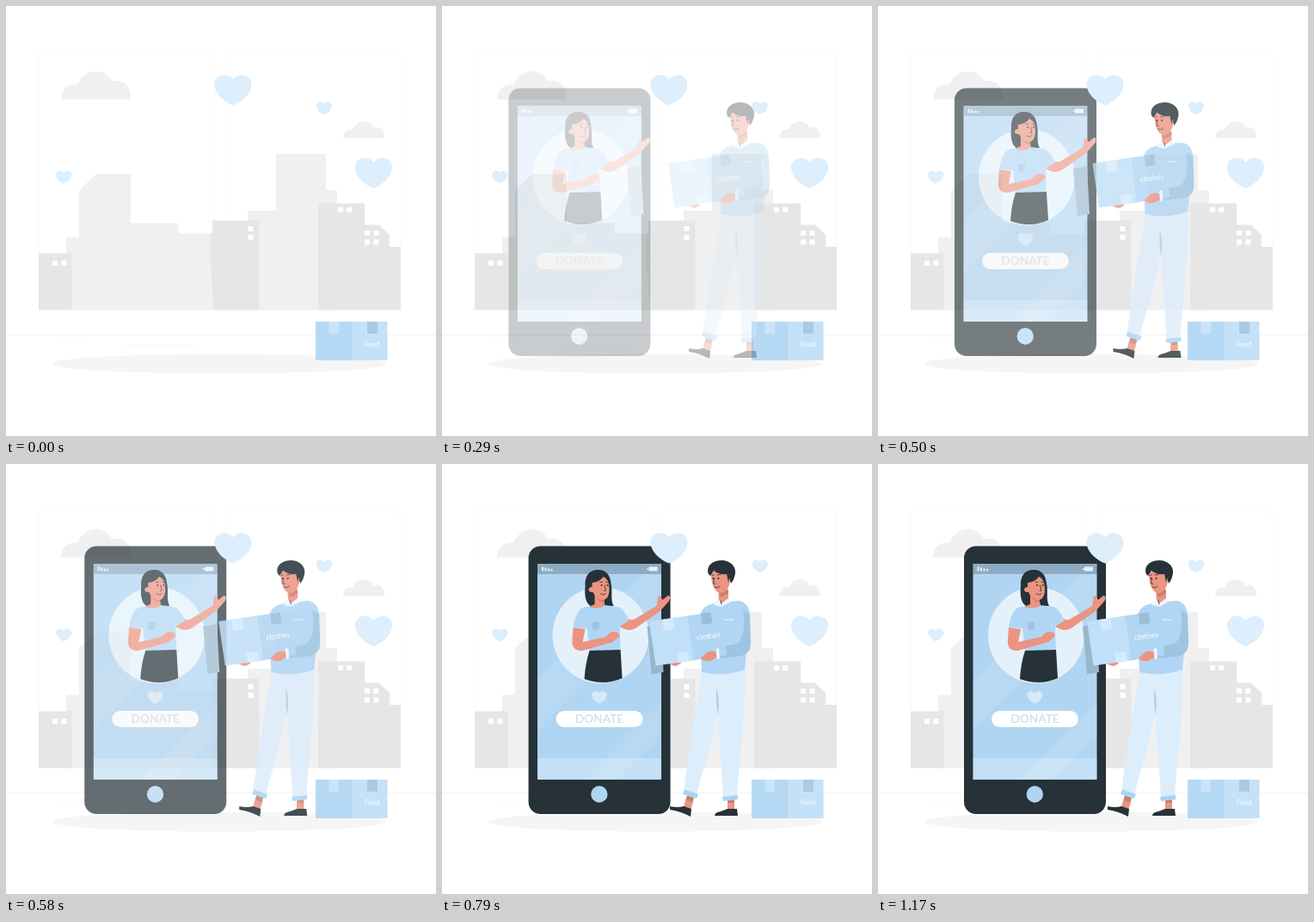
These frames come from a looping animation (500x500 px, 1.21 s). An HTML page:

```html
<!DOCTYPE html>
<html lang="en">
<head>
<meta charset="utf-8">
<title>Donation</title>
<style>
html, body { margin: 0; width: 100%; height: 100%; overflow: hidden; background: #fff; }
svg { display: block; width: 100%; height: 100%; }
text { font-family: Lato, "Open Sans", sans-serif; }
.dark { fill: #263238; }
.skin { fill: #eb9481; }
.shade { fill: #c97f70; }
.blue { fill: #b1d6f5; }
.line { fill: none; stroke: #263238; stroke-width: .8; stroke-linecap: round; }
</style>
</head>
<body>
<svg viewBox="0 0 500 500">
  <defs>
    <path id="heart" d="M0 17.5C-9 14-21.5 5-21.5-7.5C-21.5-18-6-21.5 0-12.5C6-21.5 21.5-18 21.5-7.5C21.5 5 9 14 0 17.5Z"/>
    <path id="cloud" d="M0 32.5C0 21 9 13.5 19 16C23 6 31 0 40 0C50 0 57 5 59.5 12C72 7 82 18 81 32.5Z"/>
    <clipPath id="screen"><path d="M110.5 116H254.5V367H110.5Z"/></clipPath>
  </defs>

  <g id="scene">
    <path d="M38.5 353V55.5H242.5V353M255.5 353V55.5H458.5V353" fill="none" stroke="#fafafa"/>
    <path d="M0 382.5H500" stroke="#f3f3f3"/>
    <path d="M57 390.5H97M135 395.5H225" stroke="#f8f8f8"/>
    <g fill="#f0f0f0">
      <use href="#cloud" x="64" y="76"/>
      <use href="#cloud" transform="translate(392 134.3) scale(.593)"/>
      <path d="M70 353.5V268.5H85V214L105 195.5H145V252.5H200.5V264.5H281V238H314V172H372V214H385V353.5Z"/>
    </g>
    <path fill="#e6e6e6" d="M38 287.5H76.5V353.5H38ZM240 249.5H294.5V353.5H241.5L238 300Q237 284 237.500 268L240 263ZM363 229.500H417V254.500H434L446 266V280H459V353.500H363Z"/>
    <g id="windows" fill="#fff"></g>
    <ellipse cx="248" cy="416" rx="194" ry="11.500" fill="#f5f5f5"/>
  </g>

  <g id="phone">
    <rect class="dark" x="100" y="95.500" width="165" height="311.500" rx="14"/>
    <g clip-path="url(#screen)">
      <path fill="#b0d5f3" d="M110 116H255V367H110Z"/>
      <g fill="#fff" fill-opacity=".1">
        <path d="M110 252L234 128H255V165L110 310Z"/>
        <path d="M165 367L255 277V315L203 367Z"/>
      </g>
      <path fill="#fff" fill-opacity=".25" d="M110 342H255V367H110Z"/>
      <path fill="#263238" fill-opacity=".25" d="M110 116H255V128H110Z"/>
    </g>
    <g fill="#e4f1fb">
      <path d="M115.500 119.500h2v5h-2zM119 120.500h2v4h-2zM122.500 121.500h2v3h-2zM126 122h2v2.500h-2zM240 119.500h10v5h-10zM238 121h1.500v2h-1.500z"/>
      <circle cx="184" cy="199" r="56"/>
      <use href="#heart" transform="translate(182.3 271.500) scale(.41)" fill-opacity=".7"/>
    </g>
    <rect x="132" y="287" width="101" height="19" rx="9.500" fill="#fff"/>
    <text x="182.500" y="301.300" text-anchor="middle" font-size="13.600" font-weight="700" fill="#dde0e2">DONATE</text>
    <circle cx="182.300" cy="384" r="9.700" fill="#b0d5f3"/>

    <path fill="#99b6cb" d="M238 189L254 186L257 242L243 244.500Z"/>
    <path class="dark" d="M181 123C170 123 165 131 166 142C165 152 166 161 172 165H199C195 158 198 148 196 139C195 129 190 123 181 123Z"/>
    <path class="skin" d="M206 184L214 179Q220 183 224 180L249 165L251 154L253 153L256 158L262 153C266 153 265 158 262 161L253 171L226 190C219 195 212 193 206 189Z"/>
    <path class="blue" d="M166 166L188 164L204 166C210 168 214 176 217 182L206 189L207 218H171L168 191L152 190C154 178 157 168 166 166Z"/>
    <path class="skin" d="M177 152L187 153L189 165Q179 170 170 166L177 163Z"/>
    <path class="shade" d="M178 154Q183 159 188 158L188 161Q181 160 178 154Z"/>
    <path class="skin" d="M174 138Q183 137 187 131Q194 134 194 145C194 155 190 159 185 158Q178 156 175 149C169 150 168 143 174 143Z"/>
    <path class="line" d="M183 137.500L186 137M190 137L193 138M188.500 141L190 147L188 147.500M184 151Q188 153 190 150.500"/>
    <circle class="dark" cx="185" cy="141" r="1"/><circle class="dark" cx="192" cy="141" r="1"/>
    <path class="dark" d="M171 217L207 216L209 249Q188 258.500 165 250Q166 232 171 217Z"/>
    <path class="skin" d="M152 190L166 192L163 207L190 201C194 195 200 193 205 197L206 200L198 207L163 217C153 218 150 212 151 203Z"/>
    <path fill="#9bc5e7" d="M174 184L182 183V191L178 194L174 192Z"/>
  </g>

  <g fill="#ddeefc">
    <use href="#heart" x="264" y="98"/>
    <use href="#heart" x="427.500" y="194.500"/>
    <use href="#heart" transform="translate(369.800 119) scale(.42)"/>
    <use href="#heart" transform="translate(67.200 199) scale(.42)"/>
  </g>

  <g id="crate">
    <path fill="#b5d9f5" d="M360 367H403V412H360Z"/>
    <path fill="#c5e1f8" d="M402.500 367H443.500V412H402.500Z"/>
    <path fill="#cbe4f9" d="M375.500 367H387V381H375.500Z"/>
    <path fill="#aacae0" d="M420 367H432V381H420Z"/>
    <text x="417" y="396" font-size="7.800" fill="#fff">Food</text>
  </g>

  <g id="man">
    <path class="shade" d="M287 385L295 388L291 402L283 399ZM334 389H342V403H334Z"/>
    <path class="skin" d="M286 391L294 393L291 402L283 399ZM334 394H342V403H334Z"/>
    <path class="dark" d="M267 398Q276 400 283 398L292 401L291 410Q280 404 267 402ZM319 409Q319 405 326 404L334 401H345L346 409Z"/>
    <path fill="#dcedfb" d="M305 241L354 236C356 280 348 340 345 387L329 388C327 350 324 312 322 288C316 325 305 355 298 385L283 381C288 345 296 290 305 241Z"/>
    <path fill="#b6cddd" d="M321.500 260Q325 276 323 292Q320 276 321.500 260Z"/>
    <path fill="#a9d2f3" d="M284 378.500L300 384L298 389L282 384ZM328 387L346 385V390L329 392Z"/>
    <path class="blue" d="M322 161L347 159C355 160 359 166 360 175L354 239Q330 248 304 242L301 180Q303 167 312 164Z"/>
    <path fill="#9ec4e1" d="M352 170Q356 200 345 209L322 214V226L346 224C358 222 361 216 361 207L360 175Z"/>
    <path class="skin" d="M323 146H335V158Q329 163 324 161Z"/>
    <path class="shade" d="M325 150Q331 149 334 145L335 150Q329 155 325 154Z"/>
    <path fill="#eef6fd" d="M318 160L324 158L327 162L335 156L338 160L327 166L319 164Z"/>
    <path class="line" d="M326 159L327 163"/>
    <path class="skin" d="M315 128Q320 121 335 123L336 130C341 127 343 134 337 137Q335 147 328 150C320 151 315 142 315 128Z"/>
    <path class="dark" d="M311 124C311 116 319 112 327 112C337 112 344 119 343 127Q342 134 338 139L336 132L335 138L333 128Q324 129 318 124L314 130Q311 128 311 124Z"/>
    <path class="line" d="M315.500 130L318 129M322 129L326 128.500M318.500 133L317.500 139L320 139.500M319 143Q322 145 325 142.500"/>
    <circle class="dark" cx="317.500" cy="133" r="1"/><circle class="dark" cx="323.500" cy="133" r="1"/>
    <path class="skin" d="M265 231L278 229L280 232L274 235Q268 234 265 231Z"/>
    <path fill="#c0dff8" d="M243 183L287 176.500L294 228.500L250.500 234.500Z"/>
    <path fill="#b1d6f4" d="M287 176.500L326 171L333 222L294 228.500Z"/>
    <path fill="#d5eafc" d="M258 181L271 179L272 192L260 194ZM275 220L288 218L290 229L277 231Z"/>
    <path fill="#9cbdd7" d="M303 174L314.500 172.500L316.500 185L304.500 187Z"/>
    <text transform="translate(298.500 205) rotate(-8)" font-size="8.900" fill="#fff">clothes</text>
    <path class="skin" d="M303 226L310 219Q316 216 322 219V225L314 229Q307 230 303 226Z"/>
    <path fill="#eef6fd" d="M320.500 215L324 214L325 226L321.500 227Z"/>
    <path d="M330 181H341" stroke="#e2f1fd" stroke-width="1.300"/>
  </g>
</svg>
<script>
const LOOP = 1210, FRAME = 1000 / 24, HIDDEN = 3, LAST = 28;
const $ = id => document.getElementById(id);

const panes = [[54, 296], [64.5, 296], [281.5, 256], [281.5, 266], [386, 234], [396, 234],
  [417, 261], [427.5, 261], [417, 271.5], [427.5, 271.5]];
$("windows").innerHTML = panes.map(([x, y]) => `<rect x="${x}" y="${y}" width="6" height="6"/>`).join("");

const bezier = (a, b, u) => 3 * a * u * (1 - u) ** 2 + 3 * b * u * u * (1 - u) + u ** 3;

// cubic-bezier(.36, -.01, .5, 1.38), solved by bisection
function overshoot(x) {
  if (x >= 1) return 1;
  let low = 0, high = 1;
  for (let i = 0; i < 24; i++) {
    const mid = (low + high) / 2;
    if (bezier(.36, .5, mid) < x) low = mid; else high = mid;
  }
  return bezier(-.01, 1.38, low);
}

function slideIn(id, from, step, steps) {
  const p = step < HIDDEN ? 0 : overshoot(step / steps);
  $(id).setAttribute("transform", `translate(${from * (1 - p)} 0)`);
  $(id).setAttribute("opacity", Math.min(1, Math.max(0, p)));
}

function draw(ms) {
  const step = Math.min(LAST, Math.floor((ms % LOOP + 2) / FRAME));
  slideIn("phone", -30, step, 27);
  slideIn("man", 30, step, 23);
}

const start = performance.now();
function tick() {
  draw(performance.now() - start);
  requestAnimationFrame(tick);
}
tick();
</script>
</body>
</html>
```
